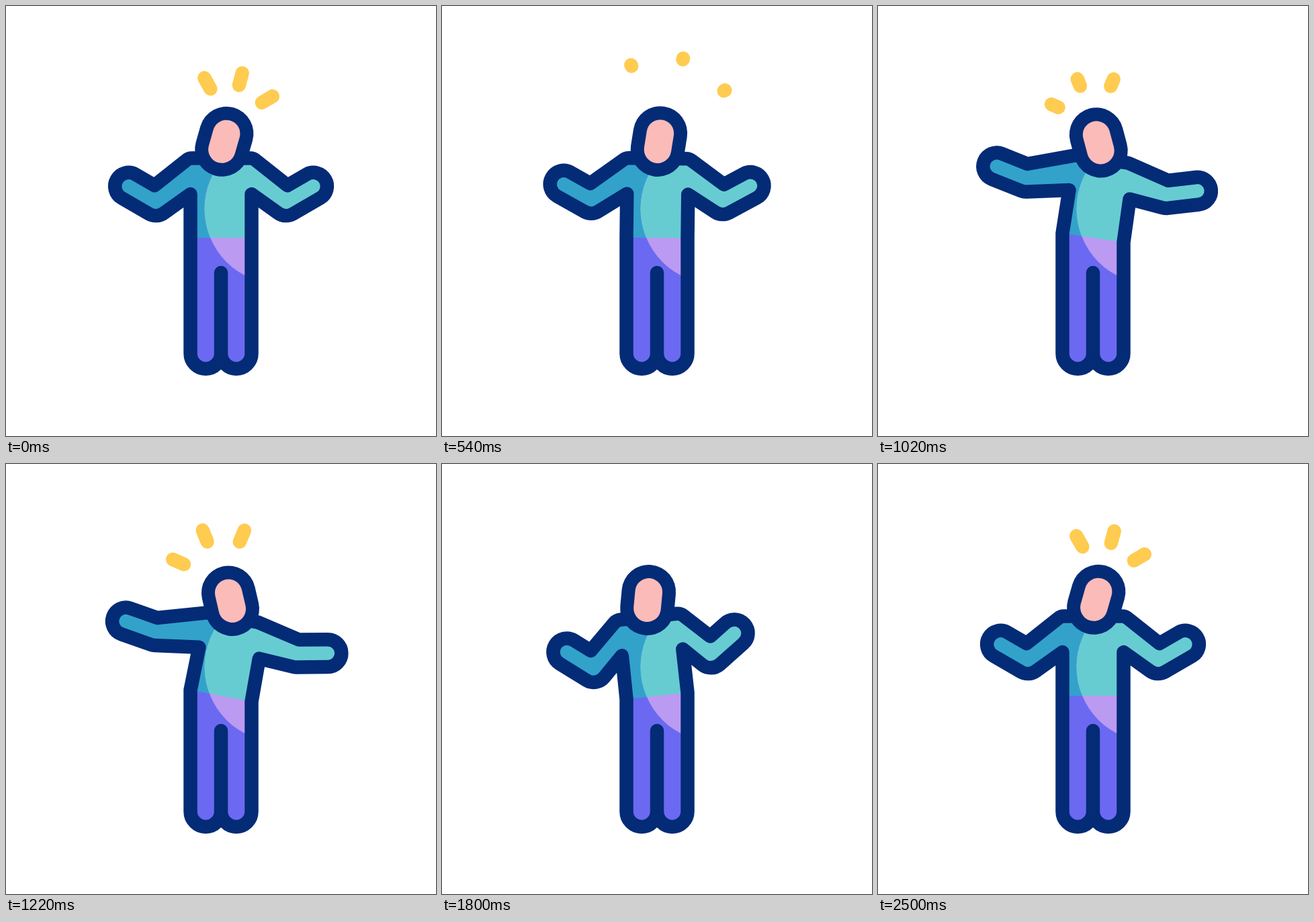
An HTML page with a canvas for the animation above (3 s loop, 640 by 640 pixels).

```html
<!DOCTYPE html>
<html lang="en">
<head>
<meta charset="utf-8">
<title>Swaying figure</title>
<style>
  html, body { margin: 0; height: 100%; overflow: hidden; background: #fff; }
  canvas { display: block; width: 100vw; height: 100vh; }
</style>
</head>
<body>
<canvas id="stage" width="640" height="640"></canvas>
<script>
const ctx = document.getElementById('stage').getContext('2d');
const LOOP = 3000, RAD = Math.PI / 180;
const LINE = 20.5, ARM = 20.4, FOREARM = 46.8;
const NAVY = '#042b76', SKIN = '#fbbbb9', RAY = '#ffcb50';
const SHIRT = '#32a2cb', SHIRT_LIT = '#67ccd1', PANTS = '#6b69f1', PANTS_LIT = '#bb9af2';

// Angles and elbows are measured in the leaning body, from the hip
const REST = {
  lean: 0, nod: 16,
  left: { x: -97, y: -53.3, lift: 30, shoulder: -48 },
  right: { x: 97, y: -53.3, lift: 30, shoulder: 48 }
};
const OPEN = {
  lean: 10.9, nod: -23.8,
  left: { x: -113.5, y: -75.5, lift: 8.5, shoulder: -42 },
  right: { x: 98.5, y: -82.7, lift: 10.8, shoulder: 34 }
};
const SHRUG = {
  lean: -6.5, nod: 16,
  left: { x: -89, y: -49.8, lift: 38.5, shoulder: -48 },
  right: { x: 86, y: -52.5, lift: 36, shoulder: 48 }
};

const mix = (a, b, p) => a + (b - a) * p;
const part = (t, from, to) => Math.min(1, Math.max(0, (t - from) / (to - from)));
const smooth = u => u * u * (3 - 2 * u);
const easeOut = u => 1 - (1 - u) ** 1.5;

// Carries a value from rest to open, to shrug and back; each part has its own delays
const track = (a, b, c, d, e, f) => t => {
  const p = smooth(part(t, a, b)), q = smooth(part(t, c, d)), r = smooth(part(t, e, f));
  return pick => {
    const rest = pick(REST);
    return mix(mix(mix(rest, pick(OPEN), p), pick(SHRUG), q), rest, r);
  };
};
const bodyTrack = track(410, 1290, 1290, 1850, 1940, 2500);
const headTrack = track(340, 1060, 1280, 1940, 1940, 2500);
const elbowTrack = track(380, 1180, 1280, 1850, 1950, 2500);

function poseAt(t) {
  const body = bodyTrack(t), elbow = elbowTrack(t);
  const limb = side => ({
    x: elbow(k => k[side].x),
    y: elbow(k => k[side].y),
    lift: body(k => k[side].lift),
    shoulder: elbow(k => k[side].shoulder)
  });
  return {
    lean: body(k => k.lean), nod: headTrack(t)(k => k.nod),
    left: limb('left'), right: limb('right')
  };
}

const polar = a => [Math.cos(a), Math.sin(a)];
const along = (p, d, k) => [p[0] + d[0] * k, p[1] + d[1] * k];

function meet(p, u, q, v) {
  const cross = u[0] * v[1] - u[1] * v[0];
  if (Math.abs(cross) < 1e-3) return q;
  return along(p, u, ((q[0] - p[0]) * v[1] - (q[1] - p[1]) * v[0]) / cross);
}

// Rounded corners of one arm, from armpit to shoulder; side is 1 left, -1 right
function arm(limb, side, body) {
  const pit = body(-side * 45.5, -65), elbow = body(limb.x, limb.y);
  const shoulder = body(limb.shoulder, -116 - Math.abs(limb.shoulder) * 0.05);
  const up = limb.lift * RAD;
  const f = body(-side * Math.cos(up), -Math.sin(up), 0, 0);
  const n = [side * f[1], -side * f[0]];
  const hand = along(elbow, f, FOREARM + ARM);
  const low = along(elbow, n, ARM), high = along(elbow, n, -ARM);
  const tangent = (p, k) => {
    const dx = elbow[0] - p[0], dy = elbow[1] - p[1];
    return polar(Math.atan2(dy, dx) - side * k * Math.asin(ARM / Math.hypot(dx, dy)));
  };
  return [
    [...pit, 0],
    [...meet(pit, tangent(pit, 1), low, f), ARM],
    [...along(hand, n, ARM), ARM],
    [...along(hand, n, -ARM), ARM],
    [...meet(shoulder, tangent(shoulder, -1), high, f), 0],
    [...shoulder, 14]
  ];
}

function outline({ lean, left, right }) {
  const [c, s] = polar(lean * RAD);
  const body = (x, y, ox = 320, oy = 345) => [ox + x * c - y * s, oy + x * s + y * c];
  const hip = x => [320 + x, 345 + x * s / c, 0];
  const foot = x => [[x, 540, 22.7], [320, 540, 22.7]];
  const pts = [
    [320, 397, 0], ...foot(274.5).reverse(), hip(-45.5),
    ...arm(left, 1, body), ...arm(right, -1, body).reverse(),
    hip(45.5), ...foot(365.5)
  ];
  const path = new Path2D();
  path.moveTo(320, 397);
  pts.forEach(([x, y, r], i) => {
    const next = pts[(i + 1) % pts.length];
    if (r) path.arcTo(x, y, next[0], next[1], r);
    else path.lineTo(x, y);
  });
  path.closePath();
  return path;
}

function stick(x1, y1, x2, y2, width, color) {
  ctx.strokeStyle = color;
  ctx.lineWidth = width;
  ctx.beginPath();
  ctx.moveTo(x1, y1);
  ctx.lineTo(x2 + 0.01, y2);
  ctx.stroke();
}

function paintClothes(lean, shirt, pants) {
  ctx.fillStyle = pants;
  ctx.fillRect(0, 0, 640, 640);
  ctx.save();
  ctx.translate(320, 345);
  ctx.rotate(lean * RAD);
  ctx.fillStyle = shirt;
  ctx.fillRect(-400, -400, 800, 400);
  ctx.restore();
}

function drawBody(pose) {
  const path = outline(pose);
  ctx.save();
  ctx.clip(path);
  paintClothes(pose.lean, SHIRT, PANTS);
  ctx.beginPath();
  ctx.arc(407.5, 302, 112, 0, 7);
  ctx.clip();
  paintClothes(pose.lean, SHIRT_LIT, PANTS_LIT);
  ctx.restore();
  ctx.strokeStyle = NAVY;
  ctx.lineWidth = LINE;
  ctx.stroke(path);
}

function drawHead({ lean, nod }) {
  const x = 317.2 + 2.4 * lean + 0.26 * nod, y = 213.5 + Math.abs(lean) * 0.2;
  const [dy, dx] = polar((lean + nod) * RAD);
  const top = [x + 24.5 * dx, y - 24.5 * dy];
  stick(x, y, ...top, 80.6, NAVY);
  stick(x, y, ...top, 40.6, SKIN);
}

function burst(cx, cy, mid, inner, outer) {
  for (const turn of [-44.5, 0, 44.5]) {
    const d = polar(-(mid + turn) * RAD);
    stick(...along([cx, cy], d, inner), ...along([cx, cy], d, outer), LINE, RAY);
  }
}

function drawRays(t) {
  if (t < 570) {
    const p = part(t, 220, 570) ** 1.2;
    burst(332.2, 172.4 + 6 * p, 75, mix(56.5, 106.5, p), mix(75, 106.5, p));
  } else if (t >= 880 && t < 1480) {
    const grow = easeOut(part(t, 880, 1200)), go = part(t, 1200, 1480) ** 1.1;
    burst(323.4, 174.7, 112, mix(mix(57, 62, grow), 91, go), mix(mix(57, 81.5, grow), 91, go));
  } else if (t >= 2110) {
    burst(332.2, 172.4, 75, 56.5, mix(56.5, 75, easeOut(part(t, 2110, 2500))));
  }
}

ctx.lineCap = ctx.lineJoin = 'round';

function frame(now) {
  const t = now % LOOP, pose = poseAt(t);
  ctx.fillStyle = '#fff';
  ctx.fillRect(0, 0, 640, 640);
  drawRays(t);
  drawBody(pose);
  drawHead(pose);
  requestAnimationFrame(frame);
}
requestAnimationFrame(frame);
</script>
</body>
</html>
```
